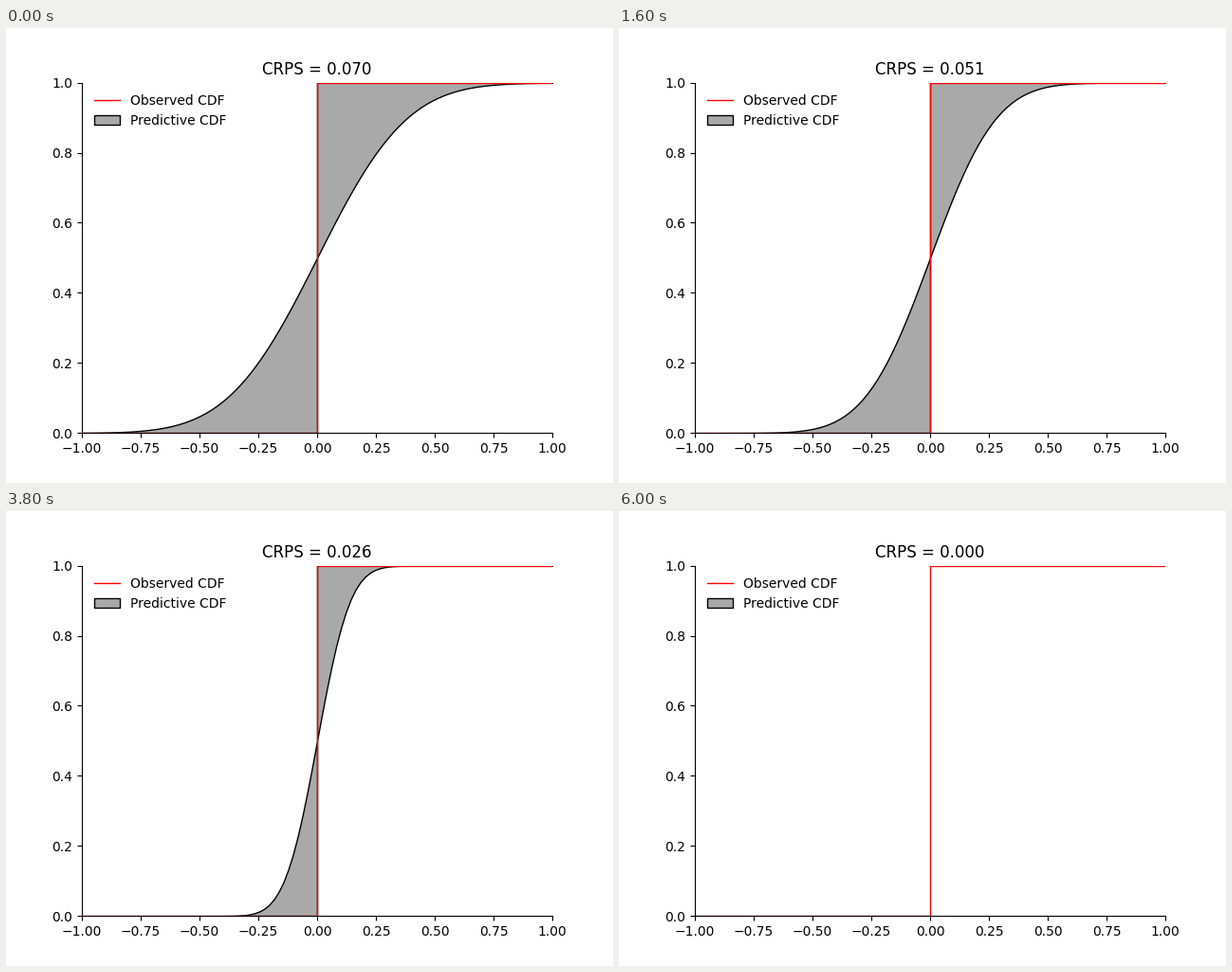
A matplotlib script for the animation above (7.2 s loop, 640 by 480 pixels).

```python
import math

import matplotlib.pyplot as plt
import numpy as np
from matplotlib.animation import FuncAnimation

STEP_MS = 200
SHRINK_STEPS = 30
HOLD_STEPS = 5
SIGMA_START = 0.3
CRPS_FACTOR = (math.sqrt(2) - 1) / math.sqrt(math.pi)

left = np.linspace(-1, 0, 50)
right = np.linspace(0, 1, 50)

fig, ax = plt.subplots(figsize=(6.4, 4.8), dpi=100)


def normal_cdf(x, sigma):
    return np.array([0.5 * (1 + math.erf(v / (sigma * math.sqrt(2)))) for v in x])


def draw(i):
    step = min(i, SHRINK_STEPS)
    sigma = SIGMA_START * (1 - step / SHRINK_STEPS)
    ax.clear()

    ax.plot([-1, 0, 0, 1], [0, 0, 1, 1], color="red", lw=1, label="Observed CDF")
    style = dict(facecolor="darkgray", edgecolor="black", lw=1)
    if sigma > 0:
        ax.fill_between(left, 0, normal_cdf(left, sigma), **style)
        ax.fill_between(right, normal_cdf(right, sigma), 1, **style)
    ax.fill_between([], [], label="Predictive CDF", **style)

    ax.set(xlim=(-1, 1), ylim=(0, 1), title=f"CRPS = {sigma * CRPS_FACTOR:.3f}")
    ax.spines[["top", "right"]].set_visible(False)
    ax.legend(loc="upper left", frameon=False)


anim = FuncAnimation(
    fig,
    draw,
    frames=SHRINK_STEPS + 1 + HOLD_STEPS,
    init_func=lambda: None,
    interval=STEP_MS,
    repeat=True,
    repeat_delay=0,
)
plt.show()
```
